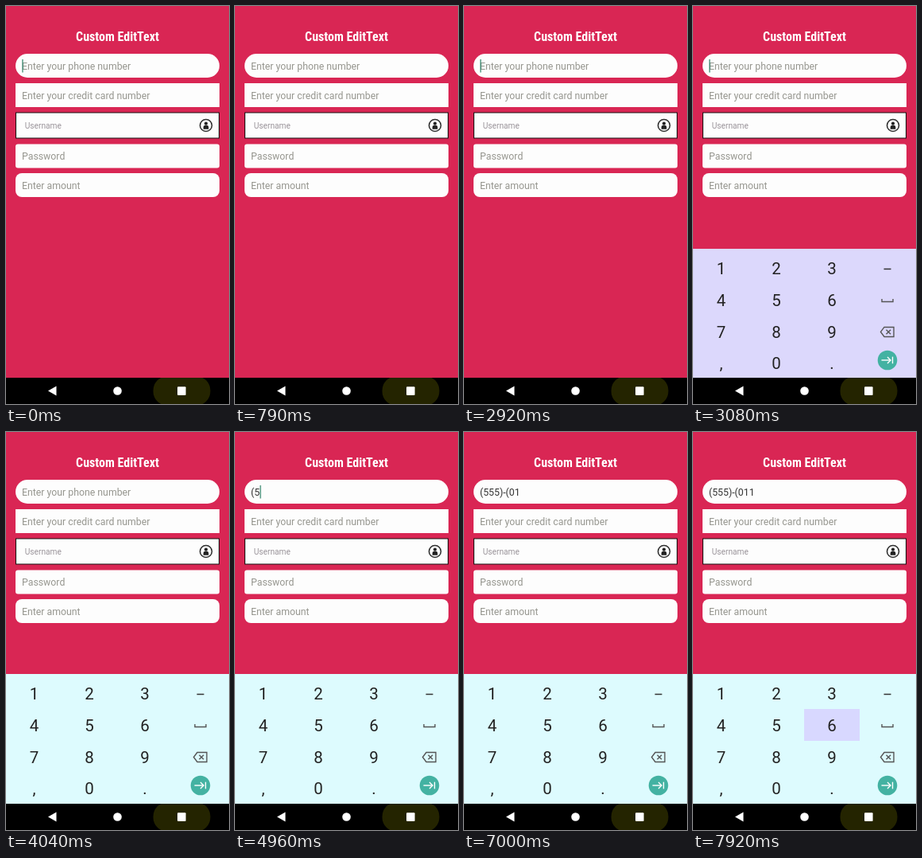
These frames come from a looping animation (281x500 px, 8000 ms). An HTML page with a canvas:

```html
<!DOCTYPE html>
<html lang="en">
<head>
<meta charset="utf-8">
<title>Custom EditText</title>
<style>
  html, body { margin: 0; width: 100%; height: 100%; overflow: hidden; background: #d92654; }
  canvas { display: block; width: 281px; height: 500px; }
</style>
</head>
<body>
<canvas id="stage" width="281" height="500"></canvas>
<script>
const ctx = document.getElementById('stage').getContext('2d');
const LOOP = 8000;
const FOCUS_AT = 3050;
const KEYBOARD = { top: 304, bottom: 467, start: 2940, length: 180, tintEnd: 3380 };
const COLUMNS = [35.5, 105, 175, 245];
const ROWS = [329, 368.8, 408.5, 448];
const KEYS = ['1', '2', '3', '4', '5', '6', '7', '8', '9', ',', '0', '.'];

// Key, finger down, character typed, highlight cleared (ms)
const PRESSES = [
  ['5', 4580, 4720, 4880],
  ['5', 5080, 5220, 5380],
  ['5', 5560, 5700, 5860],
  ['0', 5960, 6170, 6330],
  ['1', 6390, 6500, 6580],
  ['1', 7260, 7420, 7580],
  ['6', 7870, 8060, 8220],
];

function text(str, x, y, font, color, align = 'left') {
  ctx.font = font;
  ctx.fillStyle = color;
  ctx.textAlign = align;
  ctx.fillText(str, x, y);
}

function box(x, y, w, h, r, color) {
  ctx.fillStyle = color;
  ctx.beginPath();
  ctx.roundRect(x, y, w, h, r);
  ctx.fill();
}

function disc(x, y, r, color) {
  ctx.fillStyle = color;
  ctx.beginPath();
  ctx.arc(x, y, r, 0, Math.PI * 2);
  ctx.fill();
}

function trace(points, color, width, close = false) {
  ctx.beginPath();
  points.forEach(([x, y]) => ctx.lineTo(x, y));
  if (close) ctx.closePath();
  ctx.strokeStyle = color;
  ctx.lineWidth = width;
  ctx.stroke();
}

function phoneText(t) {
  const digits = PRESSES.filter(p => p[2] <= t).map(p => p[0]).join('');
  if (!digits) return '';
  const rest = digits.slice(3);
  return '(' + digits.slice(0, 3) + (rest && ')-(' + rest);
}

// The caret blink restarts on focus and after every typed character.
function caretVisible(t) {
  const restarts = [-80, FOCUS_AT, ...PRESSES.map(p => p[2])];
  const last = Math.max(...restarts.filter(s => s <= t));
  return (t - last) % 1000 < 500;
}

function drawPersonIcon(x, y) {
  ctx.beginPath();
  ctx.arc(x, y, 7.5, 0, Math.PI * 2);
  ctx.strokeStyle = '#333';
  ctx.lineWidth = 1.6;
  ctx.stroke();
  disc(x, y - 2.3, 2.1, '#222');
  box(x - 3.3, y, 6.6, 4.8, [2, 2, 0.5, 0.5], '#222');
}

function drawForm(t) {
  const white = '#fdfdfd', hint = '#96968f', font = '12.3px Roboto, sans-serif';
  ctx.fontStretch = 'condensed';
  text('Custom EditText', 140.5, 44, 'bold condensed 16px "Roboto Condensed", Roboto, sans-serif', '#fff', 'center');
  ctx.fontStretch = 'normal';

  box(12, 60, 257, 30, 15, white);
  box(12, 97, 257, 30, 0, white);
  box(12, 133.5, 257, 33, 0, '#151010');
  box(13, 134.5, 255, 31, 0, white);
  box(12, 173.5, 257, 30, 3, white);
  box(12, 210, 257, 30, 8, white);

  const phone = phoneText(t);
  text(phone || 'Enter your phone number', 20, 80, font, phone ? '#333' : hint);
  if (caretVisible(t)) {
    const x = 20.3 + (phone ? ctx.measureText(phone).width : 0);
    box(x, 67, 1.3, 16.5, 0, '#3c8a72');
  }
  text('Enter your credit card number', 20, 116.8, font, hint);
  text('Username', 23.7, 154, '10.2px Roboto, sans-serif', '#9a949a');
  text('Password', 20, 193.2, font, hint);
  text('Enter amount', 20, 230, font, hint);
  drawPersonIcon(252, 150);
}

function drawKeyIcons() {
  const [, , , x] = COLUMNS, gray = '#555';
  trace([[x - 4.5, 329.5], [x + 4.5, 329.5]], '#333', 1.5);
  trace([[x - 7, 367], [x - 7, 370.5], [x + 7, 370.5], [x + 7, 367]], gray, 1.4);
  trace([[x - 8.5, 408.5], [x - 4, 402.5], [x + 8, 402.5], [x + 8, 414.5], [x - 4, 414.5]], gray, 1.4, true);
  trace([[x - 1.5, 405.7], [x + 4.1, 411.3]], gray, 1.4);
  trace([[x - 1.5, 411.3], [x + 4.1, 405.7]], gray, 1.4);

  disc(x, 444, 12.3, '#43b2a2');
  trace([[x - 7.5, 444], [x + 4, 444]], '#fff', 1.4);
  trace([[x, 440], [x + 4, 444], [x, 448]], '#fff', 1.4);
  trace([[x + 6.5, 439.7], [x + 6.5, 448.3]], '#fff', 1.4);
}

function drawKeyboard(t) {
  const p = Math.min((t - KEYBOARD.start) / KEYBOARD.length, 1);
  if (p < 0) return;
  const { top, bottom } = KEYBOARD;
  ctx.save();
  ctx.beginPath();
  ctx.rect(0, 0, 281, bottom);
  ctx.clip();
  ctx.globalAlpha = Math.min(p * 2, 1);
  ctx.translate(0, 20 * (1 - p) ** 2);
  box(0, top, 281, bottom - top, 0, t < KEYBOARD.tintEnd ? '#dcd8fc' : '#ddfbfe');

  for (const [key, down, , clear] of PRESSES) {
    if (t < down || t >= clear) continue;
    const i = KEYS.indexOf(key);
    box(i % 3 * 70, 308 + Math.floor(i / 3) * 40, 70, 40, 0, '#d8d8ff');
  }
  KEYS.forEach((key, i) => {
    text(key, COLUMNS[i % 3], ROWS[Math.floor(i / 3)] + 7.3, '20.5px Roboto, sans-serif', '#222', 'center');
  });
  drawKeyIcons();
  ctx.restore();
}

function drawNavBar() {
  ctx.save();
  ctx.beginPath();
  ctx.rect(0, 467, 281, 33);
  ctx.clip();
  box(0, 467, 281, 33, 0, '#000');
  box(185.5, 465, 72, 37, 18, '#242400');
  ctx.fillStyle = '#fff';
  ctx.beginPath();
  ctx.moveTo(53, 483.5);
  ctx.lineTo(63.5, 477.5);
  ctx.lineTo(63.5, 489.5);
  ctx.fill();
  disc(140.5, 483.5, 5.3, '#fff');
  box(216, 478.3, 10.6, 10.6, 1, '#fff');
  ctx.restore();
}

function frame() {
  const t = performance.now() % LOOP;
  box(0, 0, 281, 500, 0, '#d92654');
  drawForm(t);
  drawKeyboard(t);
  drawNavBar();
  requestAnimationFrame(frame);
}
frame();
</script>
</body>
</html>
```
